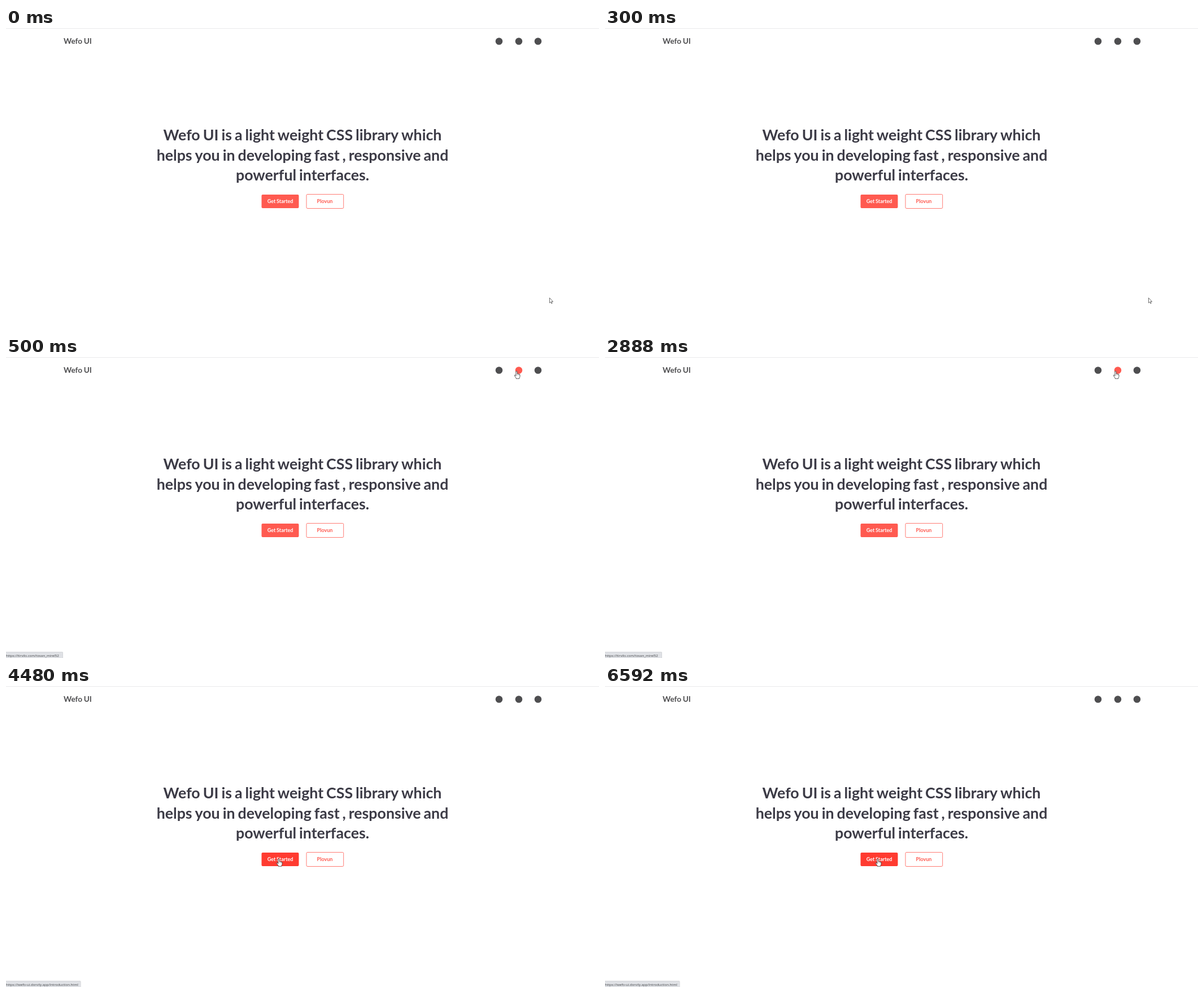
Animation, 1050 px wide and 533 px high, one loop 8 s. Source, as an HTML page with a canvas:

```html
<!DOCTYPE html>
<html lang="en">
<head>
<meta charset="utf-8">
<title>Landing page</title>
<style>
  html, body { margin: 0; width: 100%; height: 100%; overflow: hidden; background: #fff; }
  canvas { display: block; }
</style>
</head>
<body>
<canvas id="stage" width="1050" height="533"></canvas>
<script>
const ctx = document.getElementById('stage').getContext('2d');
const LOOP = 8000;
const CORAL = '#ff5a50', CORAL_HOVER = '#ff3b30', GREY = '#4e4e50', INK = '#3c3b46';

const SCENES = [
  { start: 0, cursor: { draw: drawArrow, x: 962, y: 477 } },
  { start: 500, hover: 'social', cursor: { draw: drawHand, x: 904, y: 25 },
    status: { text: 'https://tirvilo.com/tovan_mirel52', width: 101 } },
  { start: 4480, hover: 'start', cursor: { draw: drawHand, x: 483, y: 306 },
    status: { text: 'https://wefo-ui.dorvily.app/introduction.html', width: 132.5 } }
];

const HEADLINE = [
  'Wefo UI is a light weight CSS library which',
  'helps you in developing fast , responsive and',
  'powerful interfaces.'
];

function text(string, x, y, size, color, align = 'center', font = 'Lato', weight = 700) {
  ctx.font = `${weight} ${size}px "${font}", sans-serif`;
  // The page's Lato has a narrower space than the installed one.
  ctx.wordSpacing = font === 'Lato' ? `${-0.058 * size}px` : '0px';
  ctx.textAlign = align;
  ctx.fillStyle = color;
  ctx.fillText(string, x, y);
}

function dot(x, color) {
  ctx.fillStyle = color;
  ctx.beginPath();
  ctx.arc(x, 23.5, 6.3, 0, Math.PI * 2);
  ctx.fill();
}

function roundBox(x, y, w, h, r) {
  ctx.beginPath();
  ctx.roundRect(x, y, w, h, r);
}

function outlined(path, x, y, width) {
  ctx.save();
  ctx.translate(x, y);
  ctx.fillStyle = '#fff';
  ctx.strokeStyle = '#333';
  ctx.lineWidth = width;
  ctx.lineJoin = 'round';
  ctx.fill(path);
  ctx.stroke(path);
  ctx.restore();
}

function drawArrow(x, y) {
  outlined(new Path2D('M.5 .8V9.8L2.5 8L3.9 11L5.2 10.4L3.9 7.5H6.6Z'), x, y, 0.7);
}

function drawHand(x, y) {
  outlined(new Path2D(
    'M-1.1 8.5V1Q-1 0 0 0T1.1 1V4.6Q2.5 4 3 5.1Q4.4 4.6 4.8 5.7' +
    'Q6 5.5 6 6.9V9.3Q6 11 4.9 12V13.3H-.8V12.2L-3.6 8.2' +
    'Q-4 7 -3 6.8Q-2.1 6.7 -1.1 8.5Z'), x, y, 0.8);
  ctx.strokeStyle = '#555';
  ctx.lineWidth = 0.5;
  ctx.beginPath();
  for (const dx of [1.1, 3, 4.8]) {
    ctx.moveTo(x + dx, y + 5);
    ctx.lineTo(x + dx, y + 7.5);
  }
  ctx.stroke();
}

function drawStatus({ text: address, width }) {
  ctx.fillStyle = '#c9cacd';
  roundBox(0, 522, width, 12, [0, 2, 0, 0]);
  ctx.fill();
  ctx.fillStyle = '#dfe1e5';
  roundBox(0, 522.5, width - 0.5, 12, [0, 2, 0, 0]);
  ctx.fill();
  text(address, 0, 530.5, 6.15, '#3e4044', 'left', 'Open Sans', 400);
}

function drawPage(hover) {
  ctx.fillStyle = '#fff';
  ctx.fillRect(0, 0, 1050, 533);
  ctx.fillStyle = '#e9e9ea';
  ctx.fillRect(0, 0, 1050, 1);

  text('Wefo UI', 102, 28.3, 13.6, GREY, 'left');
  dot(873, GREY);
  dot(908, hover === 'social' ? CORAL : GREY);
  dot(942, GREY);

  HEADLINE.forEach((line, i) => text(line, 525, 199.3 + i * 35.3, 26.75, INK));

  ctx.fillStyle = hover === 'start' ? CORAL_HOVER : CORAL;
  roundBox(452.5, 295, 66, 24, 2);
  ctx.fill();
  text('Get Started', 485.6, 310.2, 9.05, '#fff');

  ctx.strokeStyle = CORAL;
  ctx.lineWidth = 0.8;
  roundBox(532, 294.5, 65.7, 25, 2);
  ctx.stroke();
  text('Plovun', 564.5, 310.2, 9.05, CORAL);
}

function render(now) {
  const t = now % LOOP;
  const scene = SCENES.findLast(s => t >= s.start) || SCENES[0];
  drawPage(scene.hover);
  if (scene.status) drawStatus(scene.status);
  scene.cursor.draw(scene.cursor.x, scene.cursor.y);
}

const origin = performance.now();
function tick() {
  render(performance.now() - origin);
  requestAnimationFrame(tick);
}
tick();
</script>
</body>
</html>
```
